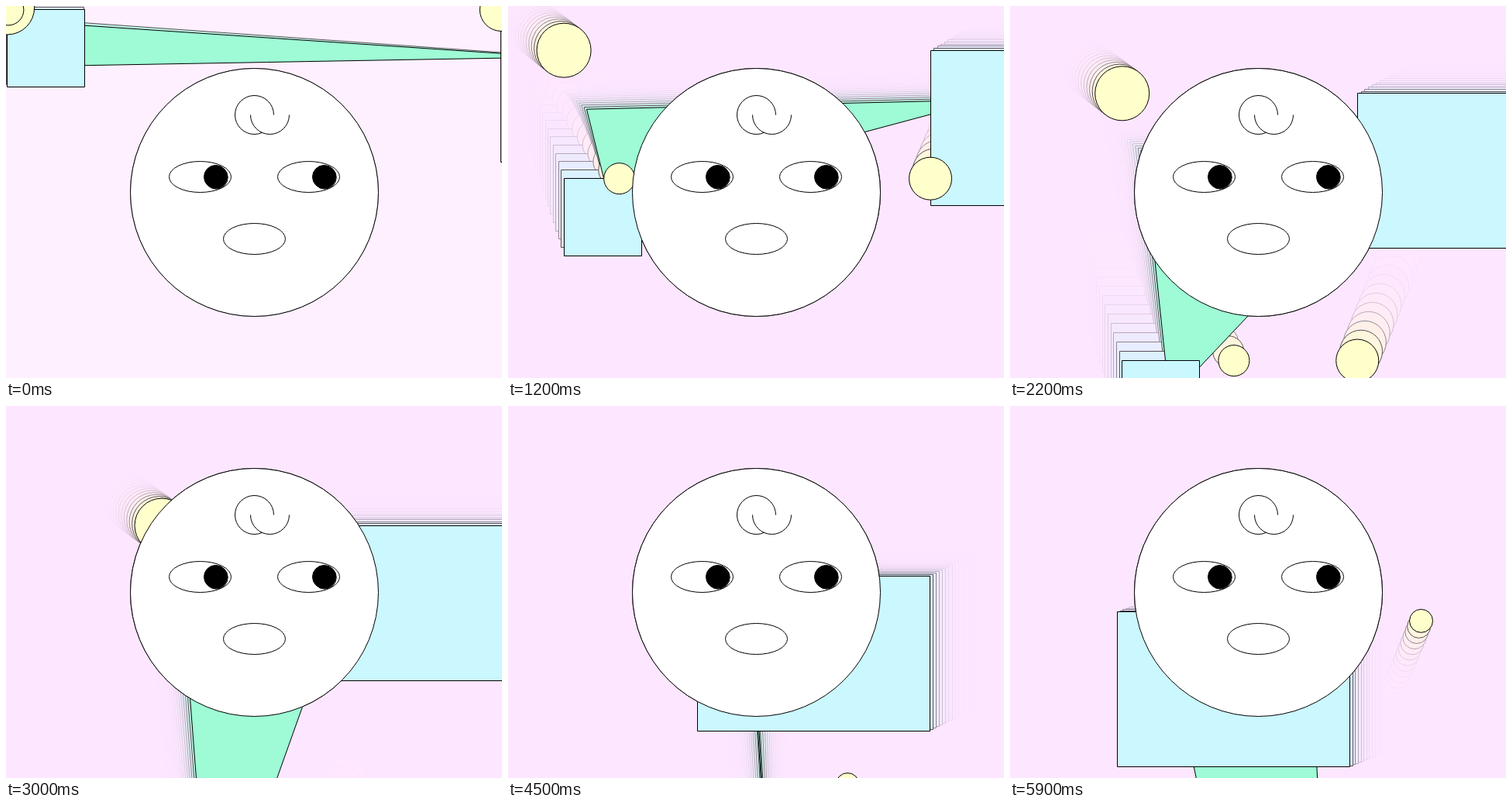
These frames come from a looping animation (640 by 480 pixels, 6000 ms). An HTML page with a canvas:

```html
<!DOCTYPE html>
<html lang="en">
<head>
<meta charset="utf-8">
<title>Drifting shapes</title>
<style>
html, body { margin: 0; width: 100%; height: 100%; overflow: hidden; background: #fde6ff; }
canvas { display: block; }
</style>
</head>
<body>
<canvas id="stage" width="640" height="480"></canvas>
<script>
const ctx = document.getElementById('stage').getContext('2d');
const LOOP = 6000, STEP = 100, TRAIL = 14, FADE = 0.35;
const PAPER = '253,230,255', BLUE = '#cbf7ff', GREEN = '#9efbd5', YELLOW = '#ffffcb';

// Drift to the right: [step, distance]; everything else follows from it
const keys = [[0, 1.2], [7, 38.2], [12, 71.6], [22, 144.2], [30, 200.5], [45, 297], [59, 376.2]];
const last = keys.length - 1;

const speed = i => (keys[i + 1][1] - keys[i][1]) / (keys[i + 1][0] - keys[i][0]);
function tangent(i) {
  if (i === 0) return 2 * speed(0) - tangent(1);
  if (i === last) return 2 * speed(last - 1) - tangent(last - 1);
  const before = keys[i][0] - keys[i - 1][0], after = keys[i + 1][0] - keys[i][0];
  return (speed(i - 1) * after + speed(i) * before) / (before + after);
}
function drift(t) {
  if (t < 0) return 0;
  let i = 0;
  while (i < last - 1 && t > keys[i + 1][0]) i++;
  const [t0, v0] = keys[i], [t1, v1] = keys[i + 1];
  const h = t1 - t0, u = (t - t0) / h, w = 1 - u;
  return w * w * ((1 + 2 * u) * v0 + u * h * tangent(i)) +
         u * u * ((3 - 2 * u) * v1 - w * h * tangent(i + 1));
}

function paint(fill) {
  if (fill) {
    ctx.fillStyle = fill;
    ctx.fill();
  }
  ctx.stroke();
}
function oval(x, y, rx, ry, fill) {
  ctx.beginPath();
  ctx.ellipse(x, y, rx, ry, 0, 0, Math.PI * 2);
  paint(fill);
}
const disc = (x, y, r, fill) => oval(x, y, r, r, fill);
function box(x, y, w, h) {
  ctx.beginPath();
  ctx.rect(Math.round(x), Math.round(y), w, h);
  paint(BLUE);
}
function curl(x, from, to) {
  ctx.beginPath();
  ctx.arc(x, 140, 25, from, to);
  paint();
}
function triangle(x1, y1, x2, y2, x3, y3) {
  ctx.beginPath();
  ctx.moveTo(x1, y1);
  ctx.lineTo(x2, y2);
  ctx.lineTo(x3, y3);
  ctx.closePath();
  paint(GREEN);
}

function shapes(a) {
  const slow = 0.5 + 0.788 * a - 6e-7 * a ** 3;
  const fast = 0.8 + 3.02 * a + 0.001 * a * a;
  const left = 640 - a * 4 / 3;
  triangle(a + 30 - 1.2e-4 * a * a, slow + 76,
           1.035 * a + 56, 18 + 3.1 * a + 0.002 * a * a,
           left + 70, slow + 64);
  box(a, fast, 100, 100);
  box(left, slow, 300, 200);
  disc(a, slow, 35, YELLOW);
  disc(2 * a, fast, 20, YELLOW);
  disc(left, fast, 27.5, YELLOW);
  disc(2 * slow, 2 * left, 15, YELLOW);
}

function face() {
  disc(320, 240, 160, '#fff');
  curl(320, 1.16, Math.PI * 2);
  curl(340, 0, Math.PI);
  for (const x of [250, 390]) {
    oval(x, 220, 40, 20, '#fff');
    disc(x + 20.8, 220.6, 15);
    disc(x + 20, 220, 15, '#000');
  }
  oval(320, 300, 40, 20, '#fff');
}

// Two passes per step, each veiling the ones before it
function render(step) {
  const end = step * 2, start = Math.max(-1, end - TRAIL);
  ctx.setTransform(1, 0, 0, 1, 0, 0);
  ctx.fillStyle = start < 0 ? '#fff' : `rgb(${PAPER})`;
  ctx.fillRect(0, 0, 640, 480);
  ctx.setTransform(1, 0, 0, 1, 0.5, 0.5);
  ctx.strokeStyle = '#000';
  for (let k = start; k <= end; k++) {
    ctx.fillStyle = `rgba(${PAPER},${FADE})`;
    ctx.fillRect(-1, -1, 642, 482);
    shapes(drift(k / 2));
    face();
  }
}

let shown = -1;
const origin = performance.now();
function tick() {
  const step = Math.floor(((performance.now() - origin) % LOOP) / STEP);
  if (step !== shown) render(shown = step);
  requestAnimationFrame(tick);
}
tick();
</script>
</body>
</html>
```
